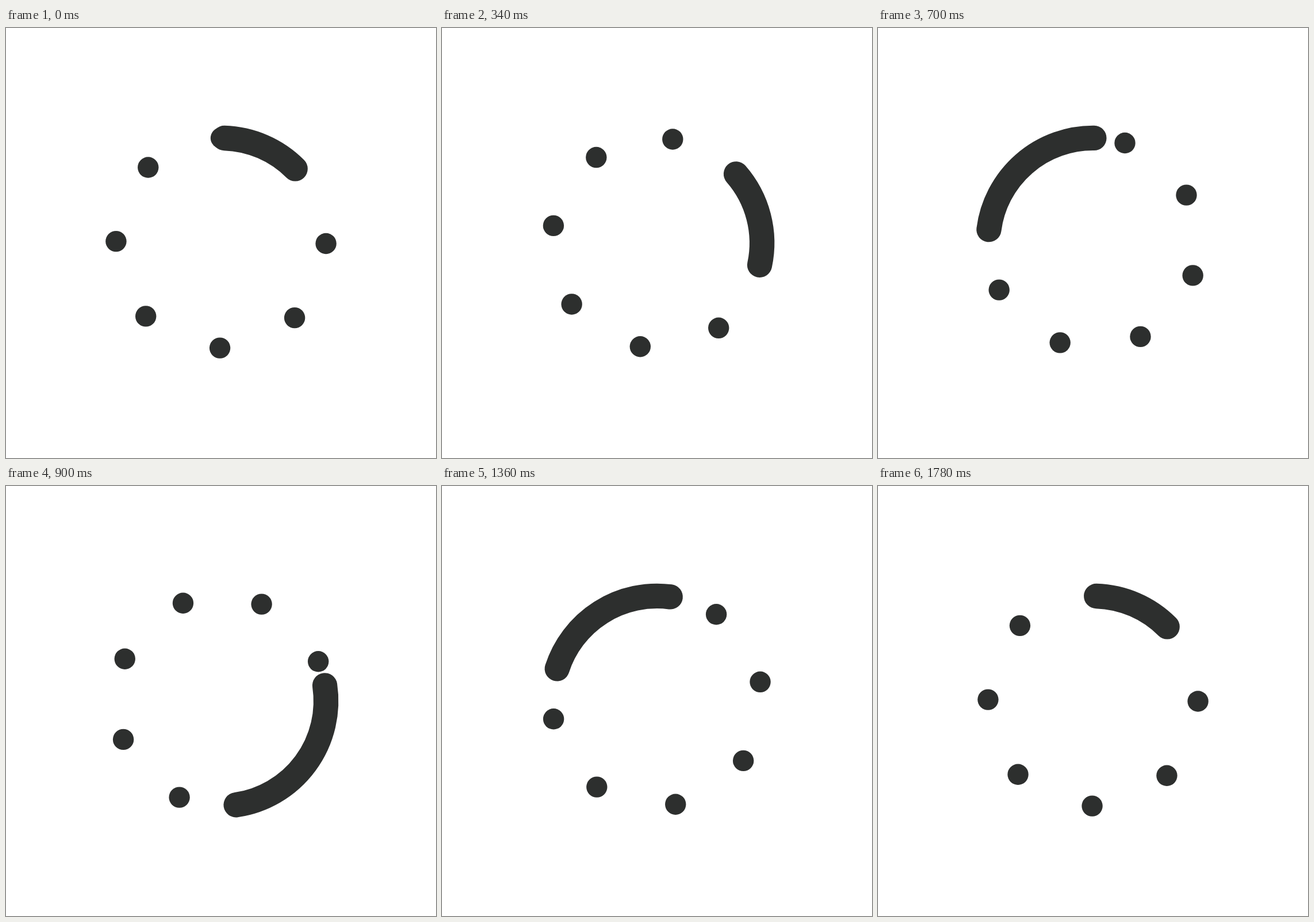
An HTML page with a canvas that plays this animation: 748 px wide and 748 px high, repeating every 1.82 s.

```html
<!DOCTYPE html>
<html lang="en">
<head>
<meta charset="utf-8">
<title>Loading ring</title>
<style>
html, body { margin: 0; height: 100%; overflow: hidden; background: #fff; }
canvas { display: block; }
</style>
</head>
<body>
<canvas id="stage" width="748" height="748"></canvas>
<script>
const ctx = document.getElementById('stage').getContext('2d');
const CENTER = 374, RADIUS = 182.6, DOT = 18.2, STROKE = 43.4;
const LOOP = 1820, STEP = 20, LAST = 89;
const DOTS = 8, PITCH = 45.15;
const SHORT = 43.2, LONG = 90.3;

// Cubic Bezier easing, solved by bisection
function bezier(x1, y1, x2, y2) {
  const at = (a, b, s) => 3 * (1 - s) * (1 - s) * s * a + 3 * (1 - s) * s * s * b + s * s * s;
  return x => {
    let lo = 0, hi = 1;
    for (let i = 0; i < 30; i++) {
      const mid = (lo + hi) / 2;
      if (at(x1, x2, mid) < x) lo = mid; else hi = mid;
    }
    return at(y1, y2, (lo + hi) / 2);
  };
}

const spin = bezier(0.4545, 0, 0.332, 1);
const grow = bezier(0.52, 0, 0.68, 1);
const shrink = bezier(0.667, 0, 0.833, 0.833);

// Degrees clockwise from the top, as canvas radians
const rad = deg => (deg - 90) * Math.PI / 180;

function draw(p) {
  const head = 45 + 720 * spin(p);
  const stretch = p < 0.5 ? grow(p * 2) : 1 - shrink(p * 2 - 1);
  const tail = head - SHORT - (LONG - SHORT) * stretch;

  ctx.fillStyle = '#fff';
  ctx.fillRect(0, 0, 748, 748);
  ctx.fillStyle = ctx.strokeStyle = '#2d2f2e';

  for (let k = 0; k < DOTS; k++) {
    const a = rad(45 * p + PITCH * k);
    ctx.beginPath();
    ctx.arc(CENTER + RADIUS * Math.cos(a), CENTER + RADIUS * Math.sin(a), DOT, 0, 2 * Math.PI);
    ctx.fill();
  }

  ctx.lineWidth = STROKE;
  ctx.lineCap = 'round';
  ctx.beginPath();
  ctx.arc(CENTER, CENTER, RADIUS, rad(tail), rad(head));
  ctx.stroke();
}

const start = performance.now();
function tick() {
  const t = (performance.now() - start) % LOOP;
  draw(Math.min(LAST, Math.floor(t / STEP)) / LAST);
  requestAnimationFrame(tick);
}
tick();
</script>
</body>
</html>
```
